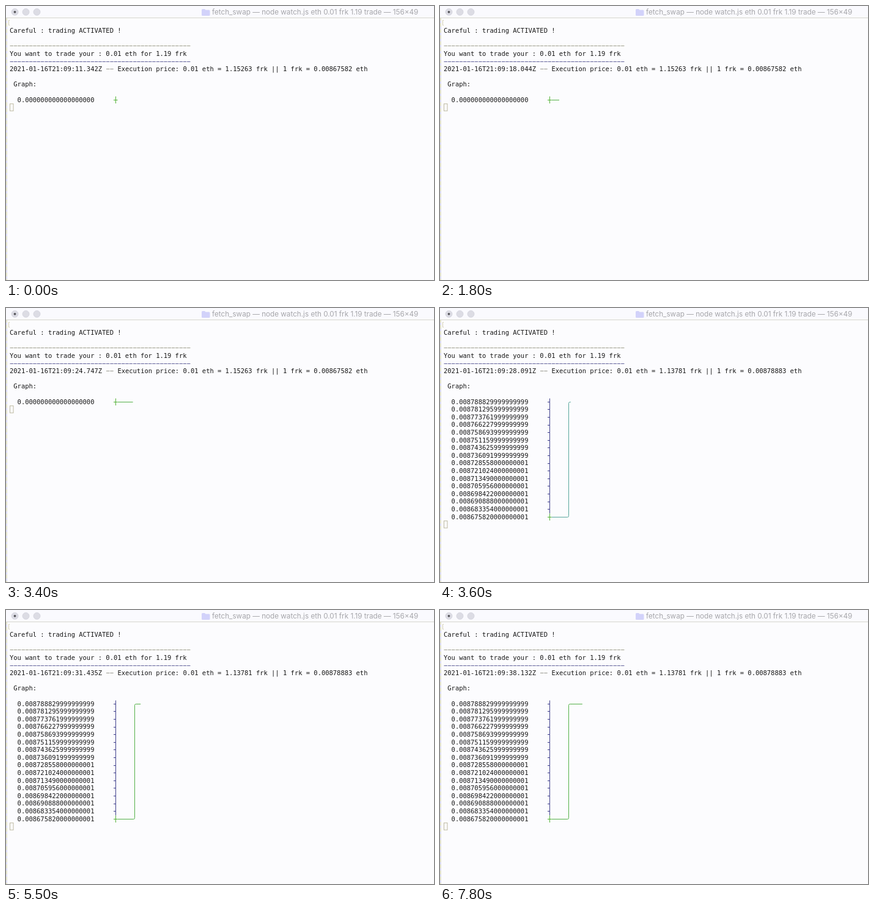
Animation of 700 by 450 pixels, one loop 8 s. Source, as an HTML page:

```html
<!DOCTYPE html>
<html lang="en">
<head>
<meta charset="utf-8">
<title>Terminal</title>
<style>
html, body { margin: 0; width: 100%; height: 100%; overflow: hidden; background: #fcfcfe; }
svg { display: block; width: 700px; height: 450px; }
.mono { font: 10.466px "DejaVu Sans Mono", monospace; white-space: pre; fill: #161616; }
.title { font: 11.7px Inter, sans-serif; fill: #a6a6aa; }
</style>
</head>
<body>
<svg id="stage" viewBox="0 0 700 450" xmlns="http://www.w3.org/2000/svg"></svg>
<script>
const stage = document.getElementById("stage");
const LOOP = 8000, CELL = 6.3, ROW = 12.6, LEFT = 6, AXIS = 179.5, STUB = 176, RISE = 210.5;
const col = c => LEFT + c * CELL;
const mid = r => 40.9 + r * ROW;
const lineY = r => Math.floor(mid(r)) + 0.5;

// start time, seconds of the clock
const ticks = [
  [0, "11.342"], [1200, "14.696"], [1800, "18.044"], [2900, "21.396"], [3300, "24.747"],
  [3600, "28.091"], [4300, "31.435"], [6000, "34.783"], [7500, "38.132"]
];
const JUMP = 5; // index of the tick where the price changes

function add(tag, attrs, text) {
  const el = document.createElementNS("http://www.w3.org/2000/svg", tag);
  for (const k in attrs) el.setAttribute(k, attrs[k]);
  if (text !== undefined) el.textContent = text;
  stage.appendChild(el);
  return el;
}
const write = (r, text, c = 0, extra = {}) =>
  add("text", { class: "mono", x: col(c), y: mid(r) + 3.2, ...extra }, text);
const path = (stroke, d = "", extra = {}) =>
  add("path", { d, stroke, fill: "none", "stroke-width": 1, ...extra });

// window frame
add("rect", { width: 700, height: 450, fill: "#fcfcfe" });
add("rect", { width: 700, height: 19, fill: "#fafafe" });
path("#d6d6cc", "M0 19.5H700");
path("#e4e4cc", "M1 20V450", { "stroke-width": 2 });
path("#dcdcf4", "M1 24V450", { "stroke-width": 2, "stroke-dasharray": "4 6" });
for (const x of [14.5, 32.5, 50.5])
  add("circle", { cx: x, cy: 9.8, r: 5.5, fill: "#dcdce4", stroke: "#cfcfd9", "stroke-width": 0.7 });
add("circle", { cx: 14.5, cy: 9.8, r: 1.9, fill: "#55555a" });
add("path", { d: "M320 6.5q0-1.5 1.5-1.5h3.5l1.5 1.5h5.5q1.5 0 1.5 1.5v6.5q0 1.5-1.5 1.5h-10.5q-1.5 0-1.5-1.5z", fill: "#d2d2fa" });
add("text", { class: "title", x: 337, y: 14 },
  "fetch_swap — node watch.js eth 0.01 frk 1.19 trade — 156×49");
path("#d4d0b4", "M6 23.5H4.5V31.5H6");

// fixed lines
write(0, "Careful : trading ACTIVATED !");
const rule = "−".repeat(47);
write(2, rule, 0, { style: "fill:#8e8e78" });
write(3, "You want to trade your : 0.01 eth for 1.19 frk");
write(4, rule, 0, { style: "fill:#48488a" });
const stamp = write(5, "");
write(5, "−−", 25, { style: "fill:#86867a" });
const price = write(5, "", 28);
write(7, " Graph:");

// graph
const labels = Array.from({ length: 16 }, (_, i) => write(9 + i, "", 2));
const axis = path("#40408c");
const line = path("#52b046");
const cross = path("#52b036");
const cursor = add("rect", { x: 6.5, width: 5.5, height: 11.5, fill: "none", stroke: "#bdb9a0" });

function labelAt(i) {
  const v = Math.round(8788830 - i * 7534);
  return i < 8 ? `0.00${v - 1}999999999` : `0.00${v}000000001`;
}

function draw(t) {
  let n = 0;
  while (n + 1 < ticks.length && t >= ticks[n + 1][0]) n++;
  const high = n >= JUMP;
  const last = high ? 15 : 0;
  const top = lineY(9), base = lineY(9 + last);
  const end = col(28 + n);

  stamp.textContent = "2021-01-16T21:09:" + ticks[n][1] + "Z";
  price.textContent = "Execution price: 0.01 eth = " + (high
    ? "1.13781 frk || 1 frk = 0.00878883 eth"
    : "1.15263 frk || 1 frk = 0.00867582 eth");
  labels.forEach((el, i) => {
    el.textContent = high ? labelAt(i) : i ? "" : "0.000000000000000000";
  });

  let stubs = "";
  if (high) {
    stubs = `M${AXIS} ${top - 6}V${base - 6}`;
    for (let i = 0; i < 15; i++) stubs += `M${STUB} ${lineY(9 + i)}H${AXIS}`;
  }
  axis.setAttribute("d", stubs);
  cross.setAttribute("d", `M${AXIS} ${base - 6}V${base + 5.5}M${STUB} ${base}H182.5`);
  line.setAttribute("d", high
    ? `M182.5 ${base}H${RISE - 2}Q${RISE} ${base} ${RISE} ${base - 2}V${top + 2}Q${RISE} ${top} ${RISE + 2} ${top}H${end}`
    : `M182.5 ${base}H${end}`);
  line.setAttribute("stroke", n === JUMP && t < 3800 ? "#58a69c" : "#52b046");
  cursor.setAttribute("y", mid(10 + last) - 6.2);
}

const start = performance.now();
function frame() {
  draw((performance.now() - start) % LOOP);
  requestAnimationFrame(frame);
}
draw(0);
requestAnimationFrame(frame);
</script>
</body>
</html>
```
